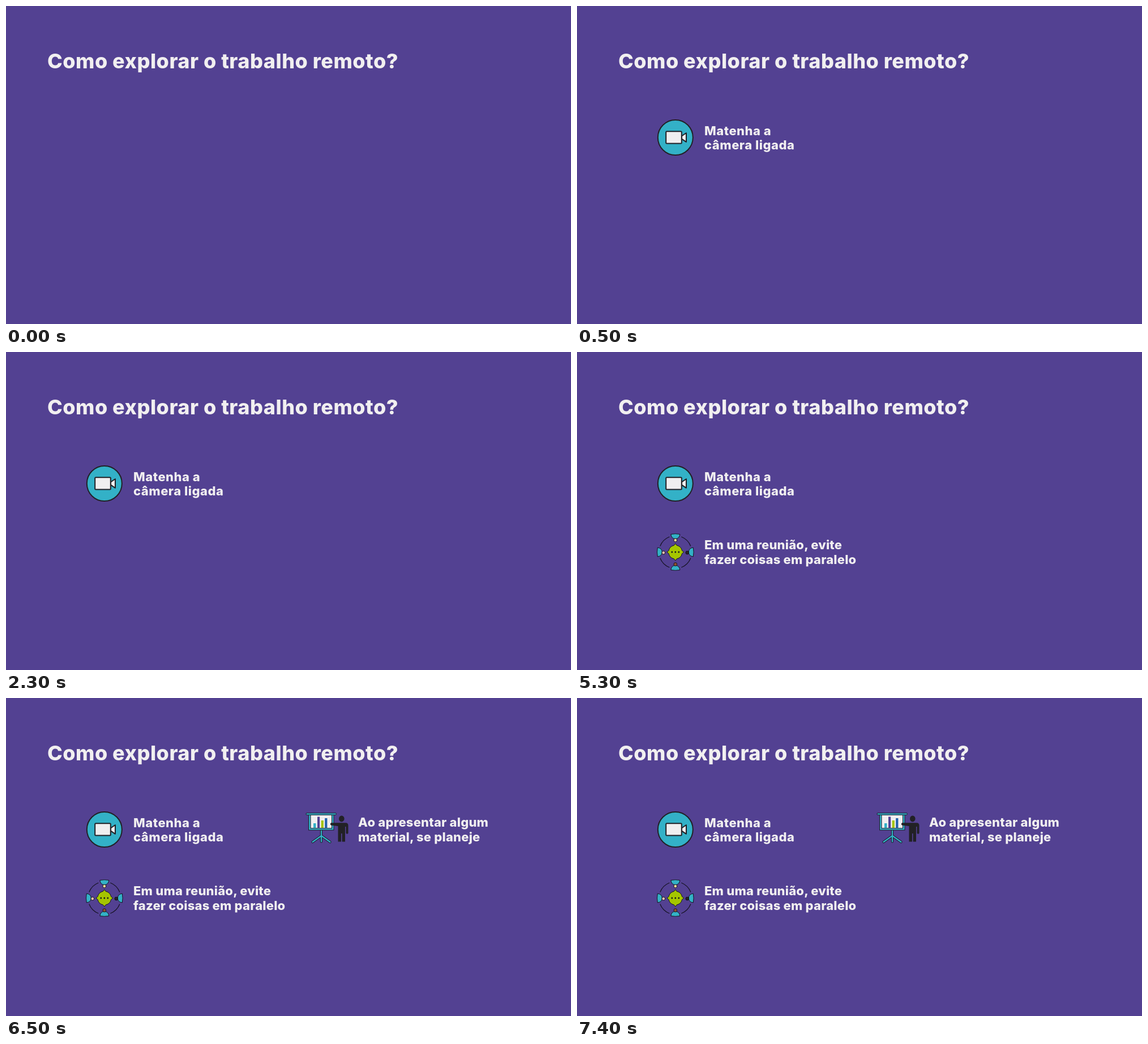
An HTML page that plays this animation: 998x561 px, repeating every 8 s.

```html
<!DOCTYPE html>
<html lang="pt">
<head>
<meta charset="utf-8">
<title>Como explorar o trabalho remoto?</title>
<style>
  html, body { margin: 0; width: 100%; height: 100%; overflow: hidden; background: #534192; }
  svg { display: block; width: 998px; height: 561px; }
  text {
    font: 800 22px Inter, "Open Sans", sans-serif;
    font-optical-sizing: none;
    letter-spacing: .2px;
    fill: #f1eff0;
  }
  .title { font-size: 36px; letter-spacing: .5px; }
  .camera text { letter-spacing: .5px; }
  .tip { animation: 8s step-end infinite; }
  .camera { animation-name: first; }
  .meeting { animation-name: second; }
  .present { animation-name: third; }
  @keyframes first  { 0% { opacity: 0 } 6.25%, 100% { opacity: 1 } }
  @keyframes second { 0% { opacity: 0 } 43.75%, 100% { opacity: 1 } }
  @keyframes third  { 0% { opacity: 0 } 81.25%, 100% { opacity: 1 } }
</style>
</head>
<body>
<svg viewBox="0 0 998 561">
  <defs>
    <path id="torso" d="M-8 -31.5Q0 -33 8 -31.5Q7 -23.5 0 -23.5T-8 -31.5Z" fill="#33b1c7" stroke="#151320"/>
    <path id="arc" d="M10.5 -27A29 29 0 0 1 27 -10.5" fill="none" stroke="#151320" stroke-width="1.2"/>
  </defs>

  <text class="title" x="73" y="109.5">Como explorar o trabalho remoto?</text>

  <g class="tip camera">
    <g fill="#f0eff0" stroke="#222126" stroke-width="2" stroke-linejoin="round">
      <circle cx="173.8" cy="232" r="31" fill="#33b1c7"/>
      <path d="M184.8 229.5L193 224V239.8L184.8 234.3Z"/>
      <rect x="157.2" y="221.2" width="27.6" height="21.2" rx="1.5"/>
    </g>
    <text x="225" y="227.5">Matenha a</text>
    <text x="225" y="253">câmera ligada</text>
  </g>

  <g class="tip meeting">
    <g transform="translate(173.8 353)">
      <use href="#arc"/>
      <use href="#arc" transform="rotate(90)"/>
      <use href="#arc" transform="rotate(180)"/>
      <use href="#arc" transform="rotate(270)"/>
      <use href="#torso"/>
      <use href="#torso" transform="rotate(90)"/>
      <use href="#torso" transform="rotate(180)"/>
      <use href="#torso" transform="rotate(270)"/>
      <g stroke="#151320">
        <circle cy="-21" r="2.9" fill="#f4d99c"/>
        <circle cx="21" cy="1" r="2.9" fill="#292126"/>
        <circle cy="21.5" r="2.9" fill="#91502f"/>
        <circle cx="-21" cy="1" r="2.9" fill="#ebbcae"/>
        <path fill="#a5c500" stroke-linejoin="round"
          d="M0 -15L2.5 -11.8A12 12 0 0 1 11.8 -2.5L15 0L11.8 2.5A12 12 0 0 1 2.5 11.8L0 15L-2.5 11.8A12 12 0 0 1 -11.8 2.5L-15 0L-11.8 -2.5A12 12 0 0 1 -2.5 -11.8Z"/>
      </g>
      <g fill="#151320">
        <circle cx="-6" r="1.4"/>
        <circle r="1.4"/>
        <circle cx="6" r="1.4"/>
      </g>
    </g>
    <text x="225" y="348">Em uma reunião, evite</text>
    <text x="225" y="373.5">fazer coisas em paralelo</text>
  </g>

  <g class="tip present">
    <g fill="none" stroke-linecap="round">
      <path d="M557 234V253.5M557 243L541.5 254M557 243L572.5 254" stroke="#1c1b28" stroke-width="4.2"/>
      <path d="M557 234V253.5M557 243L541.5 254M557 243L572.5 254" stroke="#33b1c7" stroke-width="2.2"/>
    </g>
    <g fill="#33b1c7" stroke="#1c1b28">
      <rect x="534.5" y="205.5" width="44.5" height="27.5"/>
      <rect x="538" y="206" width="37.5" height="23.8" fill="#f0eff0"/>
      <rect x="530.2" y="203" width="53" height="3.2" rx=".8"/>
    </g>
    <path d="M543 221h4.5v8h-4.5z" fill="#33b1c7"/>
    <path d="M550 209.5h4.2v19.5h-4.2z" fill="#534192"/>
    <path d="M556.7 216h4.2v13h-4.2z" fill="#a5c500"/>
    <path d="M563.2 212h4.2v17h-4.2z" fill="#2461ac"/>
    <g fill="#222126">
      <ellipse cx="592.8" cy="213" rx="4.8" ry="5.4"/>
      <path d="M574 220.2H600Q604.5 220.2 604.5 225V238.5Q602.5 241 600.5 238.5V227H599V253.5H593.6V239H592V253.5H586.5V226L574 224.5Q571.8 222.2 574 220.2Z"/>
    </g>
    <text x="622" y="227">Ao apresentar algum</text>
    <text x="622" y="252.5">material, se planeje</text>
  </g>
</svg>
</body>
</html>
```
